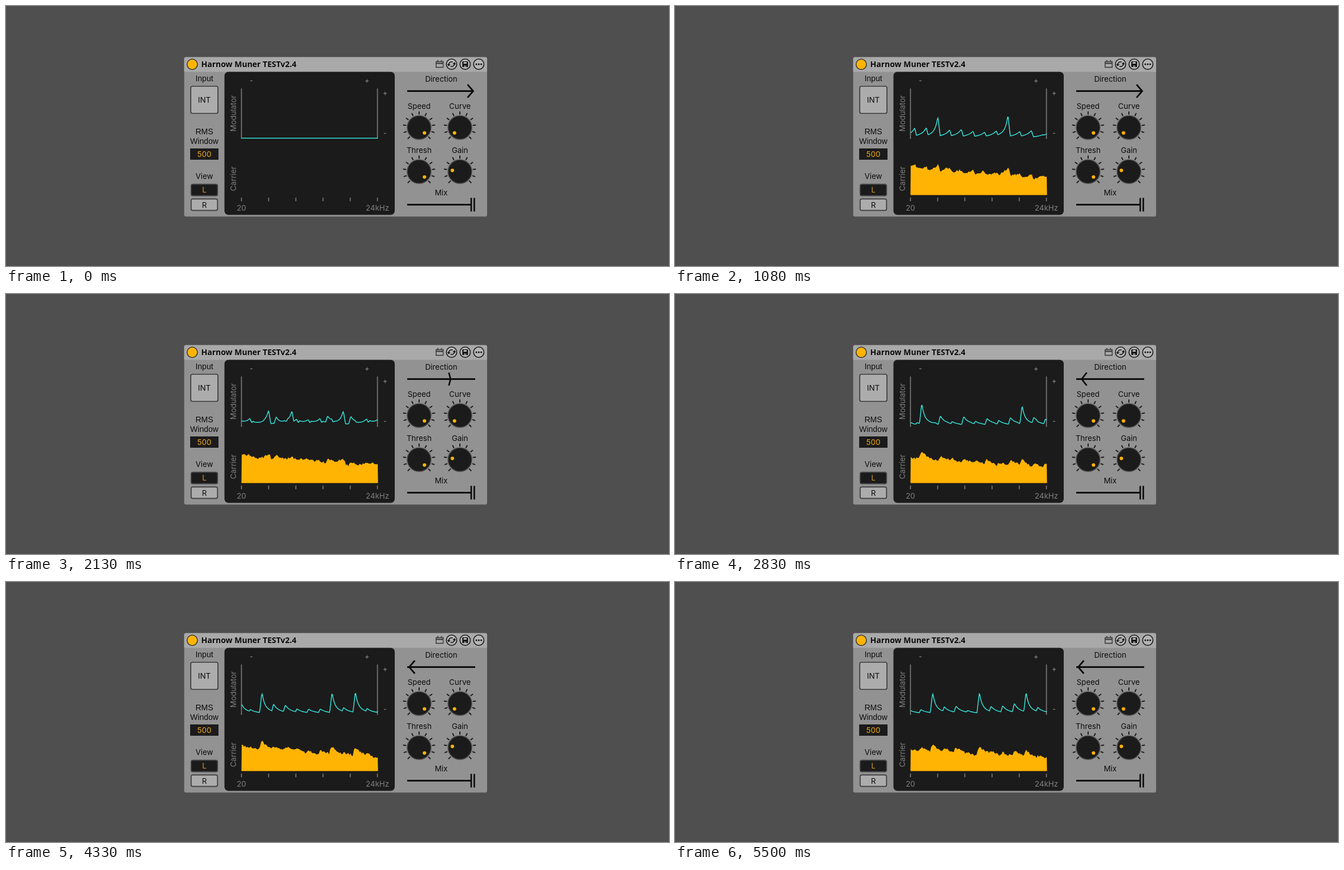
An HTML page with a canvas that plays this animation: 1170 by 460 pixels, repeating every 5.54 s.

```html
<!DOCTYPE html>
<html lang="en">
<head>
<meta charset="utf-8">
<title>Audio device</title>
<style>
html, body { margin: 0; width: 100%; height: 100%; overflow: hidden; background: #4f4f4f; }
canvas { display: block; }
</style>
</head>
<body>
<canvas id="stage" width="1170" height="460"></canvas>
<script>
const ctx = document.getElementById('stage').getContext('2d');
const LOOP = 5540, FRAME = 1000 / 24, SPEED = 0.2446, START = 25;
const LEFT = 416, SPAN = 240, MOD_BASE = 233.7, CARRIER_BASE = 334.5;
const DARK = '#1b1b1b', INK = '#0c0c0c', AMBER = '#ffb404', GREY = '#808080', PALE = '#acacac', EDGE = '#3b3b3b';
const UI = 'Inter, sans-serif', SANS = '"Liberation Sans", Arial, sans-serif';

const clamp = (v, lo, hi) => Math.min(hi, Math.max(lo, v));
const mix = (a, b, k) => a + (b - a) * k;
const random = n => { const s = Math.sin(n * 12.9898 + 4) * 43758.5453; return s - Math.floor(s); };

// A drum pattern on a grid of sixteenth notes: listed beats are loud, the rest are soft.
const BEAT = 20.6, FIRST_BEAT = 93;
const accents = [-4, 0, 6, 12, 16.4, 18.4, 27, 31, 35, 37, 43, 45, 51, 55, 59];
const hits = accents.map(beat => ({ beat, peak: 35 + 5 * random(beat) }));
for (let beat = -3; beat < 61; beat++) {
  if (!accents.includes(beat)) hits.push({ beat, peak: 6 + 12 * random(beat) ** 1.5 });
}

function font(size, family = UI, weight = 400) { ctx.font = `${weight} ${size}px ${family}`; }

function text(str, x, y, color = INK, align = 'center') {
  ctx.fillStyle = color;
  ctx.textAlign = align;
  ctx.fillText(str, x, y);
}

function line(points, color, width) {
  ctx.beginPath();
  points.forEach(([x, y]) => ctx.lineTo(x, y));
  ctx.strokeStyle = color;
  ctx.lineWidth = width;
  ctx.stroke();
}

function box(x, y, w, h, r, fill, stroke) {
  ctx.beginPath();
  ctx.roundRect(x, y, w, h, r);
  ctx.fillStyle = fill;
  ctx.fill();
  if (stroke) { ctx.strokeStyle = stroke; ctx.lineWidth = 1.7; ctx.stroke(); }
}

function disc(x, y, r, fill, stroke, width = 1.5) {
  ctx.beginPath();
  ctx.arc(x, y, r, 0, Math.PI * 2);
  ctx.fillStyle = fill;
  ctx.fill();
  if (stroke) { ctx.strokeStyle = stroke; ctx.lineWidth = width; ctx.stroke(); }
}

function sideText(str, x, y) {
  ctx.save();
  ctx.translate(x, y);
  ctx.rotate(-Math.PI / 2);
  text(str, 0, 0, GREY);
  ctx.restore();
}

function knob(label, x, y, dotX, dotY) {
  text(label, x, y - 33.5);
  for (let i = -5; i <= 5; i++) {
    const a = i * 27 * Math.PI / 180, dx = Math.sin(a), dy = -Math.cos(a);
    line([[x + dx * 23, y + dy * 23], [x + dx * 28.5, y + dy * 28.5]], '#181818', 1.9);
  }
  disc(x, y, 21, DARK, '#505050');
  disc(x + dotX, y + dotY, 3.1, AMBER);
}

function drawTitleBar() {
  box(314.5, 90.5, 534.5, 26, [3, 3, 0, 0], '#a9a9a9');
  disc(328.7, 103.2, 9.2, AMBER, '#353535');
  font(14, '"Noto Sans", sans-serif', 600);
  text('Harnow Muner TESTv2.4', 344.5, 108, INK, 'left');

  line([[759, 98.5], [771.5, 98.5], [771.5, 108.5], [759, 108.5], [759, 97.8]], '#353535', 1.4);
  line([[759, 101.5], [771.5, 101.5]], '#353535', 2);
  for (const x of [762, 768.5]) line([[x, 95.5], [x, 99]], '#353535', 1.6);

  for (const x of [786.3, 810.3, 834.3]) disc(x, 103, 9.2, '#b4b4b4', '#171717', 1.6);
  for (const turn of [0, Math.PI]) {
    ctx.save();
    ctx.translate(786.3, 103);
    ctx.rotate(turn);
    line([[-5, 2], [-5, -1], [-2, -4], [2, -4]], INK, 1.5);
    line([[-7, 0], [-5, 2.5], [-2.5, 0]], INK, 1.3);
    ctx.restore();
  }
  box(805.3, 98, 10, 10, 1, INK);
  box(807.5, 99, 5.5, 3.3, 0, '#b4b4b4');
  box(808, 105, 4.5, 3, 0, '#777');
  for (const dx of [-4.3, 0, 4.3]) disc(834.3 + dx, 103, 1.5, INK);
}

function drawLeftColumn() {
  font(14, SANS);
  text('Input', 350, 133);
  text('RMS', 350, 226.5);
  text('Window', 350, 243.5);
  font(13.4);
  text('View', 350, 305.5);
  box(326, 142, 48, 48, 3, PALE, EDGE);
  text('INT', 350, 171);
  box(325, 252, 50, 20, 0, DARK);
  text('500', 350, 267.2, '#f0aa18');
  box(326.7, 315.3, 46.6, 20.4, 3, DARK, '#444');
  text('L', 350, 330, '#d89a1c');
  box(326.7, 341.3, 46.6, 20.4, 3, PALE, EDGE);
  text('R', 350, 356.7);
}

function drawRightColumn(direction) {
  font(13.4);
  text('Direction', 768, 133.5);
  text('Mix', 768, 334.5);
  knob('Speed', 729, 215, 9.5, 9.5);
  knob('Curve', 801, 215, -9.5, 9.5);
  knob('Thresh', 729, 293, 9.5, 9.5);
  knob('Gain', 801, 293, -13.3, -2.2);

  const tip = mix(711.5, 824.5, direction), back = tip - 10 * (2 * direction - 1);
  line([[708, 150.5], [direction === 1 ? 825 : 828, 150.5]], INK, 3);
  line([[back, 139], [tip, 150.5], [back, 162]], INK, 2.8);
  line([[708, 351.5], [820, 351.5]], INK, 3);
  for (const x of [821, 826.4]) line([[x, 339.5], [x, 363.5]], INK, 2.7);
}

// Height of the modulator at a position along its recorded history:
// a short attack, then a fast and a slow decay.
function signal(pos) {
  if (pos < START * SPEED) return 0;
  let level = 1.3;
  for (const { beat, peak } of hits) {
    const d = pos - FIRST_BEAT - beat * BEAT;
    if (d < -4) continue;
    const fast = 0.6 * Math.min(1, peak / 35), tail = Math.max(0, d - 1);
    const shape = d < 0 ? 1 + d / 4 : fast * Math.exp(-tail / 4) + (1 - fast) * Math.exp(-tail / 18);
    level = Math.max(level, peak * shape);
  }
  return level;
}

// The carrier falls towards high frequencies, sinks slowly and follows the modulator's loudness.
function carrier(x, time, frame, level) {
  const floor = 38 - 16 * x / SPAN - 7 * (time / LOOP) ** 2;
  const ripple = 1.5 * Math.sin(x / 9 + time / 150) + 4 * (random(x + frame * 37.3) - 0.5);
  return floor + 3.7 * Math.log2(Math.max(2, level)) + ripple;
}

function drawScreen(time, frame, direction) {
  box(385.5, 116.5, 300.5, 253, 7, DARK);
  font(13.4);
  sideText('Modulator', 406, 190);
  sideText('Carrier', 406, 305.5);
  text('20', 415.5, 362, GREY);
  text('24kHz', 655.5, 362, GREY);
  font(12, UI, 600);
  text('-', 433, 136, GREY);
  text('+', 637, 136, GREY);
  text('+', 669, 158, GREY);
  text('-', 669, 229, GREY);
  for (const x of [415.5, 655.5]) line([[x, 146], [x, 235]], GREY, 1.6);
  for (let x = 415.5; x < 660; x += 48) line([[x, 339], [x, 345.5]], GREY, 1.6);

  const head = time * SPEED, filled = clamp((time - START) * SPEED, 0, SPAN);
  const curve = [], top = [];
  for (let x = 0; x <= SPAN; x++) {
    const level = mix(signal(head - SPAN + x), signal(head - x), direction);
    curve.push([LEFT + x, MOD_BASE - level]);
    if (x <= filled && x % 2 === 0) top.push([LEFT + x, CARRIER_BASE - carrier(x, time, frame, level)]);
  }
  if (filled > 0) {
    ctx.beginPath();
    ctx.moveTo(LEFT - 0.5, CARRIER_BASE);
    top.forEach(([x, y]) => ctx.lineTo(x, y));
    ctx.lineTo(LEFT + filled + 0.5, CARRIER_BASE);
    ctx.fillStyle = AMBER;
    ctx.fill();
  }
  line(curve, '#35e3da', 1.5);
}

function draw(now) {
  const frame = Math.floor((now % LOOP + 5) / FRAME), time = frame * FRAME;
  const direction = clamp((2900 - time) / 1200, 0, 1);
  ctx.fillStyle = '#4f4f4f';
  ctx.fillRect(0, 0, 1170, 460);
  box(314.5, 90.5, 534.5, 282, 3, '#929292');
  drawTitleBar();
  drawLeftColumn();
  drawRightColumn(direction);
  drawScreen(time, frame, direction);
}

const origin = performance.now();
function tick() {
  draw(performance.now() - origin);
  requestAnimationFrame(tick);
}
tick();
</script>
</body>
</html>
```
